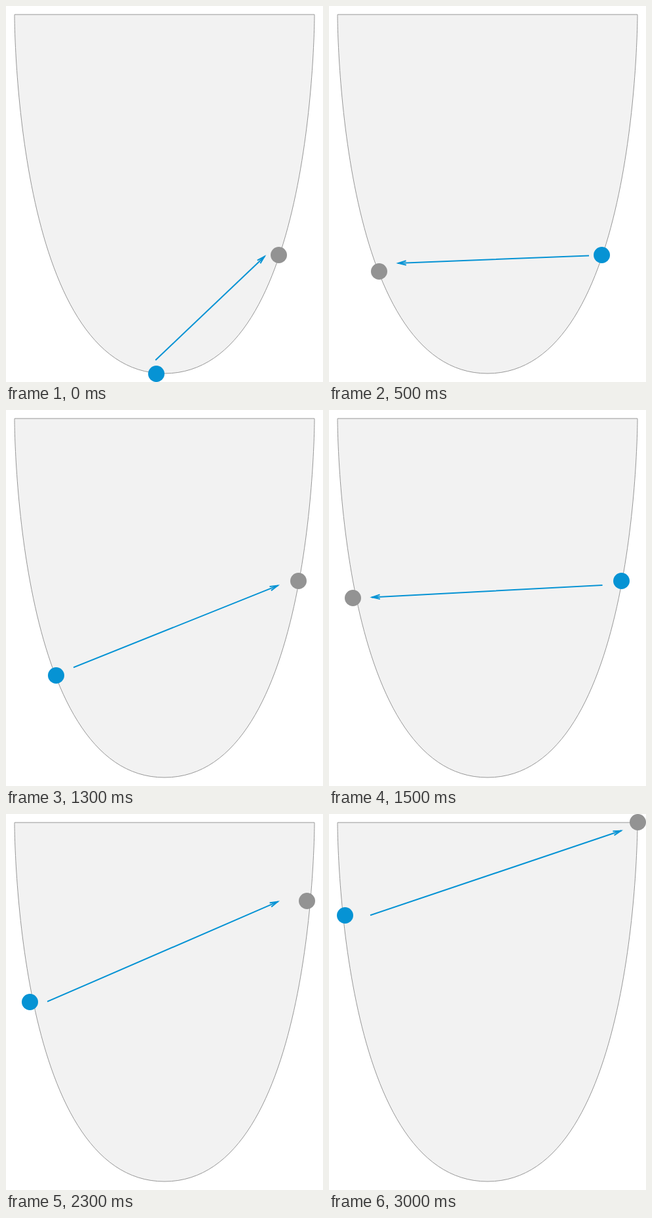
An HTML page that plays this animation: 484 px wide and 573 px high, repeating every 3.5 s.

```html
<!DOCTYPE html>
<html lang="en">
<head>
<meta charset="utf-8">
<title>Zigzag steps</title>
<style>
  html, body { margin: 0; height: 100%; overflow: hidden; background: #fff; }
  svg { display: block; }
  #arrow { fill: none; stroke: #0693d4; stroke-width: 2; stroke-linecap: square; }
</style>
</head>
<body>
<svg width="484" height="573" viewBox="0 0 484 573">
  <path d="M13 13H471Q471 13 471 13C471 13 471 560 242 560S13 13 13 13Z" fill="#f2f2f2" stroke="#979797"/>
  <circle id="next" r="12.5" fill="#939393"/>
  <circle id="current" r="12.5" fill="#0693d4"/>
  <g id="arrow">
    <path id="shaft"/>
    <path d="M-12.8-3L-2 0L-12.8 3"/>
  </g>
</svg>
<script>
const STEP = 500;
// Key points of the climb: each dot, and the arrow joint beside it
const dots = [[229.5, 560.5], [416.5, 379.5], [76.5, 404.5], [446.5, 260.5],
  [36.5, 286.5], [459.5, 132.5], [24.5, 154.5], [471.5, 12.5]];
const joints = [[229, 539], [396, 380.5], [104, 392], [416.5, 267],
  [64, 285.5], [416.5, 133], [64, 154], [447.5, 25]];

const byId = id => document.getElementById(id);

function place(id, [x, y]) {
  byId(id).setAttribute('cx', x);
  byId(id).setAttribute('cy', y);
}

function drawArrow([x, y], [tipX, tipY]) {
  const dx = tipX - x, dy = tipY - y;
  const angle = Math.atan2(dy, dx) * 180 / Math.PI;
  byId('arrow').setAttribute('transform', `translate(${tipX} ${tipY}) rotate(${angle})`);
  byId('shaft').setAttribute('d', `M${-Math.hypot(dx, dy)} 0H-2`);
}

function render(now) {
  const step = Math.floor(now / STEP) % (dots.length - 1);
  place('current', dots[step]);
  place('next', dots[step + 1]);
  drawArrow(joints[step], joints[step + 1]);
  requestAnimationFrame(render);
}
render(performance.now());
</script>
</body>
</html>
```
